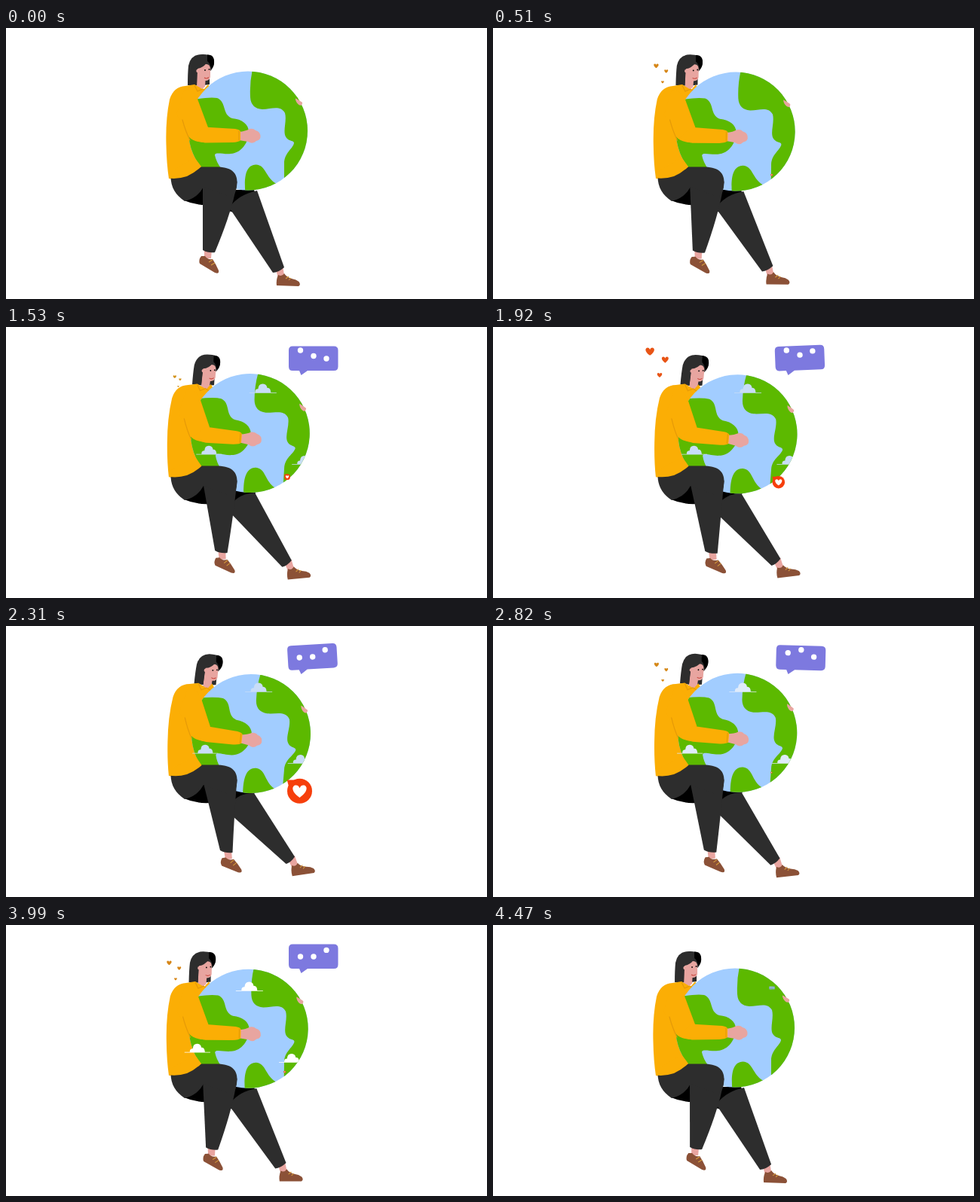
Write an HTML page that moves like this. It is 638 by 360 pixels and loops after 4500 ms.

```html
<!DOCTYPE html>
<html lang="en">
<head>
<meta charset="utf-8">
<title>Hugging the globe</title>
<style>
html, body { margin: 0; width: 100%; height: 100%; overflow: hidden; background: #fff; }
svg { display: block; width: 100vw; height: 100vh; }
.skin { fill: #e8a5a0; }
.hair, .pants { fill: #2d2d2d; }
.shirt { fill: #fbae05; }
.land { fill: #5cb900; }
.shoe { fill: #8b5137; }
.lace { fill: none; stroke: #d9a03c; stroke-width: 1; }
.fold { fill: none; stroke: #e59a08; stroke-width: 1.2; stroke-linecap: round; }
</style>
</head>
<body>
<svg viewBox="0 0 638 360" xmlns="http://www.w3.org/2000/svg">
  <defs>
    <path id="heart" d="M0 6C-9 0-7.5-6-3.6-6Q-1-6 0-3.2Q1-6 3.6-6C7.5-6 9 0 0 6Z"/>
    <path id="cloud" d="M-18 5.2H-10.5Q-11 .5-6.5 .5Q-6-6.5 0-6.3Q5-6 5.5-1Q10-1.5 10.5 5.2H18V6H-18Z"/>
    <clipPath id="disc"><circle cx="321" cy="136.5" r="79"/></clipPath>
    <clipPath id="edge"><circle id="edgeDisc" r="79"/></clipPath>
  </defs>

  <g id="hearts"><use href="#heart"/><use href="#heart"/><use href="#heart"/></g>

  <path d="M236 229Q252 236 270 235L302 245L331 221L329 215H300L262 208Q254 224 236 229Z"/>
  <g id="backFoot">
    <path class="skin" d="M357 318L367 316L369 328L361 332Z"/>
    <path class="shoe" d="M361 328Q358 335 359 342L388 343Q391.5 341 388.5 337Q385 334 379 333Q372 331 369 326Q366 331 361 328Z"/>
    <path class="lace" d="M371 333l4-3M375 335l3-3"/>
  </g>
  <path class="pants" id="backLeg"/>

  <g id="torso">
    <g id="head">
      <path class="hair" d="M241 76Q241 60 242 50Q245 34 262 35Q277 35 276 47Q275 54 270 58V75L262 76Z"/>
      <path class="skin" d="M253.5 54L264 48Q271 47 271 55V65Q270 70 264.500 70L264 78Q258 84 253 79Z"/>
      <path d="M267 35.500Q277 35 276 47Q275 53 272 54Q271 47 267 44Z"/>
      <path class="hair" d="M242 75L253 76.500L254 54Q262 53 267 45Q268 39 260 38Q245 37 243 54Z"/>
      <circle class="skin" cx="254.5" cy="57" r="2.2"/>
      <circle cx="264" cy="56" r=".9"/><circle cx="269.5" cy="55" r=".9"/>
      <path d="M263 66Q266 68 269 65.5" fill="none" stroke="#c9483f" stroke-width="1"/>
    </g>
    <path class="shirt" d="M250 75L238 77Q222 78 217 95Q211.500 122 212.500 155Q213 180 216 200Q226 202 240 197Q251 192 259 184L250 150L256 100L271 80L268 75L262 82Z"/>
    <path class="fold" d="M250 76L254 84L261 81L266 84"/>
  </g>

  <g id="globe">
    <circle cx="321" cy="136.5" r="79" fill="#a2cdff"/>
    <g class="land" clip-path="url(#disc)">
      <path d="M327 55Q323 72 324 92Q325 107 340 108C352 108 364 102 370 113C373 124 366 139 372 146C376 151 382 149 382 153C380 161 369 166 369 180V200L410 200V50Z"/>
      <path d="M240 97Q268 91 280 93C293 98 286 115 300 120C313 121 322 128 322 138C322 151 313 166 298 167C288 168 277 164 277 169Q279 178 285 186L240 190Z"/>
      <path d="M317.500 220C316 203 316 182 331.500 181.500C345 182 344 199 359 207L350 222Z"/>
    </g>
    <ellipse class="skin" cx="388.500" cy="96.500" rx="3.800" ry="6.800" transform="rotate(-28 388.500 96.500)" clip-path="url(#disc)"/>
  </g>

  <g id="clouds">
    <use href="#cloud"/><use href="#cloud"/>
    <g clip-path="url(#edge)"><use href="#cloud"/></g>
  </g>
  <ellipse id="wisp" cx="411" cy="115" rx="8.5" ry="4" fill="#b9dcff" transform="rotate(22 411 115)"/>

  <g id="arm">
    <path class="shirt" d="M236 82Q250 82 255 97L268 132L262 152Q248 151 243 145L226 115Z"/>
    <g id="forearm">
      <path class="skin" d="M309 138Q318 137 323 134Q328 133 331 136Q338 138 337.5 145Q337 149 332 150Q327 155 321 151L309 149Z"/>
      <path class="shirt" d="M262 131.5L304 134Q311 135 311 138V149Q309 151.500 300 152L264 152.500Q250 150 246 147Z"/>
      <path class="fold" d="M309 137V149"/>
    </g>
    <path class="fold" d="M234 122Q238 137 244 149"/>
  </g>

  <g id="frontFoot">
    <path class="skin" d="M263 294L273 294L272 306L263 306Z"/>
    <path class="shoe" d="M259 303Q255 308 257 313L277 325Q283 327.5 282 322Q278 313 274 307Q267 308 264 303Z"/>
    <path class="lace" d="M269 311l5-3M272 315l5-3"/>
  </g>
  <path class="pants" id="shin"/>
  <path class="pants" d="M218.500 196Q230 200 240 196Q250 192 258 184.500H276C298 184 307 191 306.500 206Q306 218 300 225L262 211Q254 226 237 230Q218 218 218.500 196Z"/>
  <path class="shirt" id="hem" d="M216 192V199.500Q228 201 240 197Q251 192 259 184L250 172Z"/>

  <g id="badge">
    <path d="M4.5 11L8 24L19 11Z" fill="#f63f0c"/>
    <circle cx="20.5" cy="25" r="15.7" fill="#f63f0c"/>
    <use href="#heart" fill="#fff" transform="translate(20.5 25.5) scale(1.3)"/>
  </g>

  <g id="bubble">
    <path d="M380 25.500H435Q440.500 25.500 440.500 31V52.500Q440.500 58 435 58H400L391.5 64L389 58H380Q375 58 375 52.500V31Q375 25.500 380 25.500Z"/>
    <g fill="#fff"><circle cx="390.500" r="3.700"/><circle cx="408" r="3.700"/><circle cx="425" r="3.700"/></g>
  </g>
</svg>
<script>
const LOOP = 4500, PEAK = 2310, BEAT = 1160, FIRST = 320;
const $ = id => document.getElementById(id);
const set = (el, name, value) => el.setAttribute(name, value);
const move = (el, value) => set(el, 'transform', value);
const lerp = (a, b, k) => a + (b - a) * k;
const ramp = (t, a, b) => Math.min(1, Math.max(0, (t - a) / (b - a)));
const mix = (a, b, k) => `rgb(${a.map((v, i) => Math.round(lerp(v, b[i], k)))})`;

function keyed(t, keys) {
  for (let i = 1; i < keys.length; i++) {
    const [t0, v0] = keys[i - 1], [t1, v1] = keys[i];
    if (t < t1) return lerp(v0, v1, ramp(t, t0, t1));
  }
  return keys[keys.length - 1][1];
}

const pulse = [[0, .5], [50, .25], [130, 0], [170, .05], [670, .93], [830, 1.05], [1000, 1], [BEAT, .5]];
const sway = [[1530, 0], [2250, -4], [2820, 1.5], [3000, 3], [3450, 0]];
const hops = [1340, 1720, 2500, 3405, 4185];
// start x, start y, end x, end y, size
const flights = [[227, 73, 206, 28, 1], [231.5, 75, 228, 40, .78], [230, 82, 220, 62, .57]];
// x at time zero, y, drift per ms, size
const drifts = [[352, 81.8, .0073, 1], [279, 163.8, .0063, .95], [407, 177, .007, .95]];

const hearts = [...$('hearts').children];
const clouds = [...$('clouds').querySelectorAll('use')];
const dots = [...$('bubble').querySelectorAll('circle')];

function drawLegs(p) {
  const at = (x0, y0, x1, y1) => `${lerp(x0, x1, p)} ${lerp(y0, y1, p)}`;
  set($('shin'), 'd', `M261 205L${at(261, 295, 284, 298)}Q${at(268, 299, 291, 302)} ${at(277, 298, 300.5, 301)}` +
    `Q${at(302, 238, 303, 245)} 306.5 204L285 190Z`);
  set($('backLeg'), 'd', `M298 236Q310 221 ${at(333, 216, 329, 222)}L${at(369, 318, 383, 306.5)}` +
    `Q${at(361, 325, 378, 314)} ${at(354, 325, 371.5, 316)}L${at(297, 240, 301, 253)}Z`);
  move($('backFoot'), `rotate(${-10.3 * p} 315 222)`);
  move($('frontFoot'), `translate(${27 * p} ${4 * p}) rotate(${-9 * p} 267 300)`);
}

function drawBody(p) {
  const lean = `rotate(${2.5 * p} 238 198)`;
  for (const id of ['torso', 'arm', 'hem']) move($(id), lean);
  move($('head'), `translate(${3 * p} ${p}) rotate(${3 * p} 258 80)`);
  move($('forearm'), `rotate(${3.5 * p} 256 142)`);
  move($('globe'), `translate(${4 * p} ${6.5 * p}) rotate(${5 * p} 321 136.5)`);
  set($('edgeDisc'), 'cx', 321 + 4 * p);
  set($('edgeDisc'), 'cy', 136.5 + 6.5 * p);
}

function drawHearts(phase, live) {
  const u = ramp(phase, 0, 650), k = 1 - (1 - u) ** 2;
  const size = live * (.3 + .7 * k * k) * (1 - ramp(phase, 770, 810));
  flights.forEach(([x0, y0, x1, y1, s], i) => {
    move(hearts[i], `translate(${lerp(x0, x1, k)} ${lerp(y0, y1, k)}) scale(${size * s})`);
    set(hearts[i], 'fill', mix([210, 145, 25], [240, 60, 20], k ** 3));
  });
}

function drawClouds(t) {
  const alpha = ramp(t, 750, 980) * (1 - ramp(t, 4200, 4420));
  const tint = mix([200, 221, 247], [255, 255, 255], ramp(t, 2400, 3400));
  drifts.forEach(([x, y, v, s], i) => {
    move(clouds[i], `translate(${x - v * t} ${y}) scale(${s})`);
    set(clouds[i], 'fill', tint);
    set(clouds[i], 'opacity', alpha);
  });
  set($('wisp'), 'opacity', t > 900 && t < 1080 ? 1 : 0);
}

function drawBubble(t) {
  const s = ramp(t, 875, 1105) * (1 - ramp(t, 4267, 4498));
  move($('bubble'), `translate(365 89) scale(${s}) translate(-365 -89) rotate(${keyed(t, sway)} 391 63)`);
  set($('bubble'), 'fill', mix([130, 178, 188], [125, 121, 223], ramp(s, 0, .9)));
  dots.forEach((dot, i) => {
    const lift = Math.max(...hops.map(h => Math.sin(Math.PI * ramp(t, h + 150 * i, h + 150 * i + 400))));
    set(dot, 'cy', 42 - 11 * lift);
  });
}

function draw(t) {
  const u = t < PEAK ? t / PEAK : (LOOP - t) / (LOOP - PEAK);
  const p = .5 * u + .25 * (1 - Math.cos(Math.PI * u));
  drawBody(p);
  drawLegs(p);
  const phase = (t - FIRST + BEAT) % BEAT;
  const live = 1 - ramp(t, 4340, 4460);
  drawHearts(phase, t < FIRST ? 0 : live);
  drawClouds(t);
  drawBubble(t);
  const s = t < FIRST + 170 ? 0 : keyed(phase, pulse) * live;
  move($('badge'), `translate(368 193) scale(${s})`);
}

function tick() {
  draw(performance.now() % LOOP);
  requestAnimationFrame(tick);
}
tick();
</script>
</body>
</html>
```
